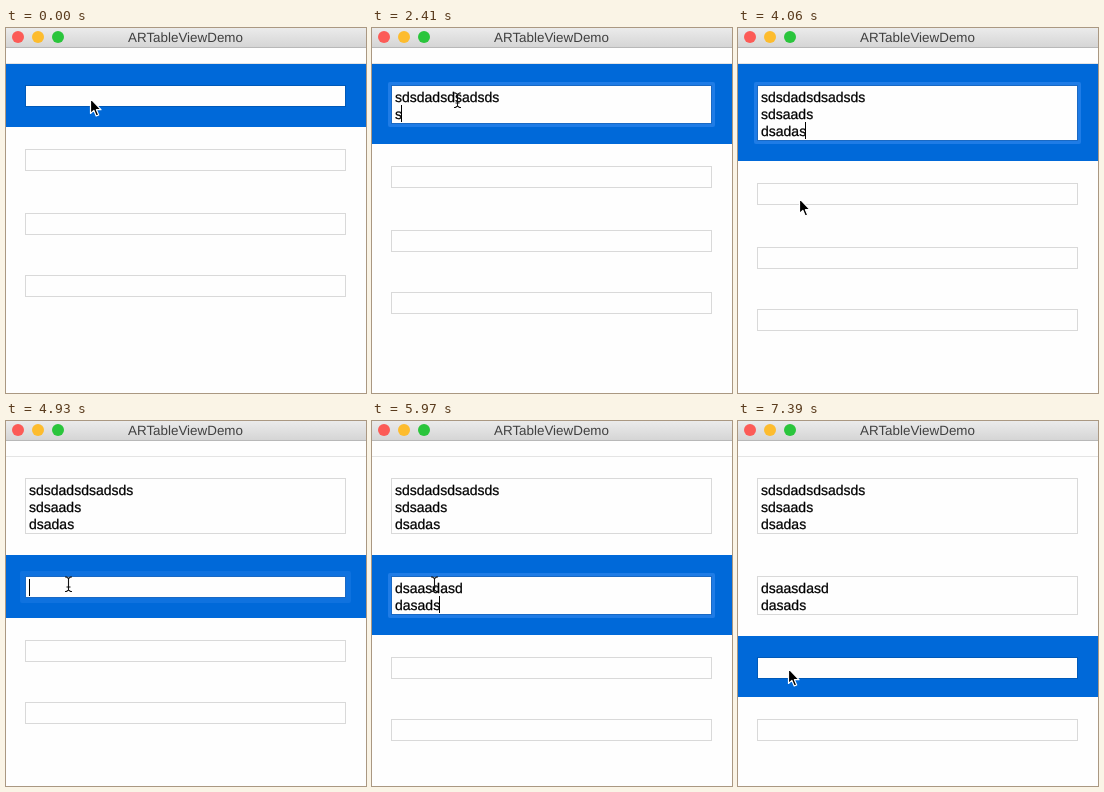
Write an HTML page that moves like this. It is 360 px wide and 365 px high and loops after 8 s.

```html
<!DOCTYPE html>
<html lang="en">
<head>
<meta charset="utf-8">
<title>Table view</title>
<style>
  html, body { margin: 0; width: 100%; height: 100%; overflow: hidden; background: #fefefe; }
  svg { display: block; }
  text { font-family: "Liberation Sans", Arial, sans-serif; text-rendering: geometricPrecision; }
  #rows text { font-size: 14px; stroke: #000; stroke-width: 0.25px; }
</style>
</head>
<body>
<svg width="360" height="365" viewBox="0 0 360 365">
  <defs>
    <linearGradient id="bar" x2="0" y2="1">
      <stop stop-color="#ebebeb"/>
      <stop offset="1" stop-color="#d4d4d4"/>
    </linearGradient>
  </defs>
  <rect width="360" height="365" fill="#fefefe"/>
  <rect width="360" height="20" fill="url(#bar)"/>
  <rect y="19" width="360" height="1" fill="#b8b8b8"/>
  <circle cx="12" cy="9" r="6" fill="#fc5b57"/>
  <circle cx="32" cy="9" r="6" fill="#fdbc2e"/>
  <circle cx="52" cy="9" r="6" fill="#2ac53c"/>
  <text x="179.5" y="14" font-size="13.4" text-anchor="middle" fill="#404040">ARTableViewDemo</text>
  <rect y="35" width="360" height="1" fill="#e4e4e4"/>
  <g id="rows"></g>
  <rect id="caret" width="1" height="17"/>
  <path id="arrow" d="M-.5 -1.5V13.5L2.9 10.4L5.2 16L7.7 15L5.4 9.7H10Z"
        stroke="#fff" stroke-width="1.2" stroke-linejoin="round"/>
  <path id="beam" d="M-3.5 -7.5H-2L0 -6L2 -7.5H3.5M0 -6V5.5M-3.5 7H-2L0 5.5L2 7H3.5M-2 2.5H2"
        fill="none" stroke="#111" stroke-width="1.1"/>
</svg>
<script>
const LOOP = 8000, TOP = 36, LINE = 17;
const OPEN_LEAD = 180, GROW = 160;   // a new line opens shortly before its first key
const RING = 3.5;

// Typing starts with `first` characters, the rest follow in equal bursts.
const rowSpecs = [
  { height: 64, lines: [
    { text: 'sdsdadsdsadsds', from: 1040, to: 1880, first: 2, bursts: 5 },
    { text: 'sdsaads', from: 2410, to: 2760, first: 1, bursts: 2 },
    { text: 'dsadas', from: 3170, to: 3520, first: 3, bursts: 1 },
  ], focus: { from: 150, settle: 60, spread: RING, blinkOff: 810, blinkOn: 1040 } },
  { height: 64, lines: [
    { text: 'dsaasdasd', from: 5100, to: 5420, first: 2, bursts: 2 },
    { text: 'dasads', from: 5800, to: 5970, first: 3, bursts: 1 },
  ], focus: { from: 4920, settle: 150, spread: 5.5, blinkOff: 6300, blinkOn: LOOP } },
  { height: 62, lines: [] },
  { height: 62, lines: [] },
];
const clicks = [0, 4080, 7370];      // each click selects the next row
const pointerStart = { x: 85, y: 72 };
const moves = [
  { from: 3520, to: 4070, x: 62, y: 172 },
  { from: 4430, to: 4860, x: 62, y: 163 },
  { from: 6430, to: 6840, x: 44, y: 275 },
  { from: 7090, to: 7360, x: 51, y: 249 },
];

const $ = id => document.getElementById(id);
const mix = (a, b, k) => a + (b - a) * k;
const progress = (t, from, to) => Math.min(1, Math.max(0, (t - from) / (to - from)));
const ease = k => k * k * (3 - 2 * k);

function set(node, attrs) {
  for (const key in attrs) node.setAttribute(key, attrs[key]);
}
function add(parent, name, attrs = {}) {
  const node = document.createElementNS('http://www.w3.org/2000/svg', name);
  set(node, attrs);
  return parent.appendChild(node);
}
function show(node, visible) {
  node.setAttribute('visibility', visible ? 'visible' : 'hidden');
}

const rows = rowSpecs.map(spec => {
  const g = add($('rows'), 'g');
  return {
    ...spec,
    band: add(g, 'rect', { width: 360, fill: '#0069d9' }),
    ring: add(g, 'rect', { rx: 2, fill: '#1f7ce6' }),
    field: add(g, 'rect', { x: 19.5, width: 320, fill: '#fefefe' }),
    texts: spec.lines.map(() => add(g, 'text', { x: 23 })),
  };
});

const opensAt = line => line.from - OPEN_LEAD;

function typedCount(line, t) {
  if (t < line.from) return 0;
  const done = Math.floor(progress(t, line.from, line.to) * line.bursts) / line.bursts;
  return Math.round(mix(line.first, line.text.length, done));
}

function pointerAt(t) {
  return moves.reduce((p, m) => {
    const k = ease(progress(t, m.from, m.to));
    return { x: mix(p.x, m.x, k), y: mix(p.y, m.y, k) };
  }, pointerStart);
}

function drawRing(ring, focus, t, top, height) {
  const k = ease(progress(t, focus.from, focus.from + focus.settle));
  const spread = mix(focus.spread, RING, k);
  set(ring, {
    x: 19.5 - spread, y: top + 0.5 - spread,
    width: 320 + 2 * spread, height: height - 1 + 2 * spread,
    opacity: mix(0.5, 1, k),
  });
}

function render(t) {
  const pointer = pointerAt(t);
  const selectedRow = clicks.filter(at => t >= at).length - 1;
  let top = TOP, beam = false, caret = null;

  rows.forEach((row, i) => {
    const extra = row.lines.slice(1).reduce((sum, line) => {
      const open = opensAt(line);
      return sum + LINE * ease(progress(t, open, open + GROW));
    }, 0);
    const height = row.height + extra, fieldTop = top + 21, fieldHeight = 22 + extra;
    const selected = i === selectedRow;
    const focus = row.focus;
    const focused = Boolean(selected && focus && t >= focus.from);
    const border = focused ? '#1a69c4' : selected ? '#0059b8' : '#d9d9d9';

    set(row.band, { y: top, height: height - 1 });
    set(row.field, { y: fieldTop + 0.5, height: fieldHeight - 1, stroke: border });
    show(row.band, selected);
    show(row.ring, focused);
    if (focused) {
      drawRing(row.ring, focus, t, fieldTop, fieldHeight);
      beam = pointer.y > fieldTop && pointer.y < fieldTop + fieldHeight;
    }

    row.lines.forEach((line, n) => {
      const node = row.texts[n], count = typedCount(line, t);
      node.textContent = line.text.slice(0, count);
      set(node, { y: fieldTop + 17 + n * LINE });
      if (focused && (n === 0 || t >= opensAt(line))) {
        const width = count ? node.getComputedTextLength() : 0;
        caret = {
          x: Math.max(23, Math.floor(22.8 + width)),
          y: fieldTop + 3 + n * LINE,
          visibility: t >= focus.blinkOff && t < focus.blinkOn ? 'hidden' : 'visible',
        };
      }
    });
    top += height;
  });

  set($('caret'), caret || { visibility: 'hidden' });
  show($('beam'), beam);
  show($('arrow'), !beam);
  const x = Math.round(pointer.x), y = Math.round(pointer.y);
  set($('beam'), { transform: `translate(${x + 0.5} ${y + 0.5})` });
  set($('arrow'), { transform: `translate(${x} ${y})` });
}

const start = performance.now();
function tick() {
  render((performance.now() - start) % LOOP);
  requestAnimationFrame(tick);
}
tick();
</script>
</body>
</html>
```
